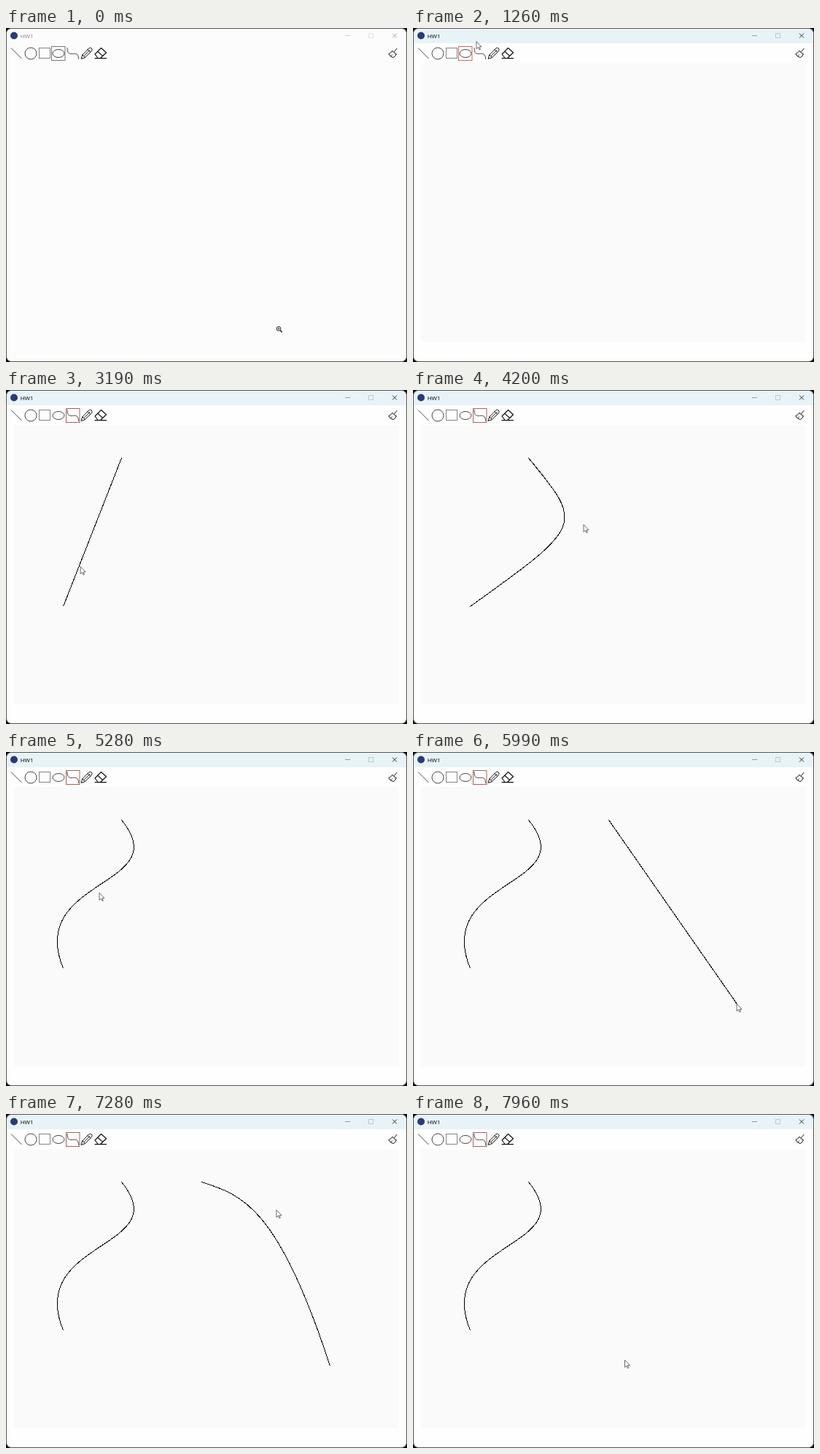
An HTML page that plays this animation: 550 by 459 pixels, repeating every 8 s.

```html
<!DOCTYPE html>
<html lang="en">
<head>
<meta charset="utf-8">
<title>HW1</title>
<style>
html, body { margin: 0; width: 550px; height: 459px; overflow: hidden; background: #000; }
svg { display: block; }
text { font: 8px "Open Sans", sans-serif; fill: #000; }
.icon { fill: none; stroke: #333; stroke-width: .9; }
.icon rect { stroke: #777; }
.bold { fill: none; stroke: #111; stroke-width: 1.2; stroke-linejoin: round; stroke-linecap: round; }
.ink { fill: none; stroke: #000; shape-rendering: crispEdges; }
.pale #window, .pale #bar, .pale #paper { fill: #fcfcfc; }
.pale #caption { opacity: .45; }
#pick { fill: none; stroke: #d9635a; }
.curving #pick { stroke: #a8605a; }
.pale #pick { stroke: #777; }
</style>
</head>
<body>
<svg id="stage" width="550" height="459" viewBox="0 0 550 459">
  <clipPath id="frame"><rect x=".5" y=".5" width="549" height="458" rx="7"/></clipPath>
  <g clip-path="url(#frame)">
    <rect id="window" width="550" height="459" fill="#fefefe"/>
    <rect id="bar" width="550" height="21" fill="#e8f3f7"/>
    <rect id="paper" x="11" y="48" width="527.5" height="384" fill="#fafafa"/>
  </g>
  <rect x=".5" y=".5" width="549" height="458" rx="7" fill="none" stroke="#555"/>

  <circle cx="11" cy="10.5" r="5" fill="#283a78"/>
  <g id="caption">
    <text x="19.7" y="13.6">HW1</text>
    <path d="M465 10.5h7" stroke="#999"/>
    <rect x="497.5" y="7.5" width="6" height="6" fill="none" stroke="#bccad2"/>
    <path d="M530 7.5l6 6m0-6l-6 6" stroke="#333"/>
  </g>

  <g class="icon">
    <path d="M7 27.5L21.5 42"/>
    <circle cx="34" cy="35" r="8"/>
    <rect x="45.5" y="27.5" width="15" height="14"/>
    <ellipse cx="72" cy="35" rx="8" ry="5.5"/>
    <path d="M84 27C84 45 99 26 99.7 43"/>
  </g>
  <g class="bold">
    <path d="M103.3 42l1.4-5 8.8-9q2-1.8 3.8 0t0 3.8l-9 8.8zM105 37l3.2 3.4M106.8 38.6l8.4-8.4M112 29.6l3.6 3.6" stroke-width="1"/>
    <path d="M122 36l8.5-8.5 7 6.2-8 7.8h-3.3zM125.8 32.3l7 6.3M122 41.6h15.5"/>
    <path d="M536 28.3l-3.4 4.2M529.8 31.6l5.4 4.2M529.8 31.6q-2 3-5 4 2 4.2 6.4 5 3.4-1.6 4-4.8M527.8 38.6l1.8-1.8" stroke-width="1"/>
  </g>
  <rect id="pick" x="62.5" y="25.5" width="18.5" height="19"/>

  <path id="first" class="ink"/>
  <path id="second" class="ink"/>

  <g id="lens" fill="none" stroke="#222">
    <circle cx="374" cy="413.3" r="2.9" fill="#fff"/>
    <path d="M372.4 413.3h3.2M374 411.7v3.2" stroke-width=".8"/>
    <path d="M376.2 415.5l2.4 2.6" stroke-width="1.6"/>
  </g>
  <path id="arrow" d="M0 0V10.2L2.4 8 4 11.4 5.4 10.8 3.9 7.4H7Z" fill="#fff" stroke="#444" stroke-width=".8"/>
</svg>
<script>
const LOOP = 8000;
const el = id => document.getElementById(id);
const move = (begin, end, x, y) => ({ begin, end, x, y });

// The hand's moves in order: when each begins and ends, and where it leads
const hand = {
  rise: move(720, 1120, 87, 18.5),
  pickTool: move(1260, 1500, 93, 35),
  start1: move(1540, 2000, 158, 93),
  reach1: move(2140, 2510, 62.5, 331),
  end1: move(2650, 2840, 78, 297),
  grip1: move(3010, 3390, 130, 180),
  bend1: move(3490, 3890, 234, 185),
  twist1: move(4300, 4870, 27, 172),
  pause: move(5180, 5280, 128, 193.5),
  start2: move(5280, 5580, 268, 93),
  end2: move(5720, 5990, 444, 346),
  bend2: move(6330, 6670, 373, 126.5),
  twist2: move(7210, 7960, 290.5, 338)
};

const smooth = p => p * p * (3 - 2 * p);
const mix = (a, b, p) => ({ x: a.x + (b.x - a.x) * p, y: a.y + (b.y - a.y) * p });

function pointer(t) {
  let spot = { x: 374, y: 412 };
  for (const m of Object.values(hand)) {
    if (t < m.begin) break;
    spot = mix(spot, m, smooth(Math.min(1, (t - m.begin) / (m.end - m.begin))));
  }
  return spot;
}

// Draw a line, bend it by pulling both handles, then twist it by pulling the far one.
// pull is how far the handles follow the hand while bending, lag how late they do.
function curve(t, { start, press, end, bend, twist, pull, lag }) {
  if (t < press) return "";
  const drag = m => pointer(Math.min(t - lag, m.end));
  const d = pointer(Math.min(t, end.end));
  let b = start, c = d;
  if (t >= bend.begin + lag) {
    b = mix(start, drag(bend), pull);
    c = mix(d, drag(bend), pull);
  }
  if (t >= twist.begin + lag) c = drag(twist);
  const at = p => `${p.x + .5} ${p.y + .5}`;
  return `M${at(start)}C${at(b)} ${at(c)} ${at(d)}`;
}

const first = {
  start: hand.start1, press: hand.reach1.begin, end: hand.end1,
  bend: hand.bend1, twist: hand.twist1, pull: 1, lag: 0
};
const second = {
  start: hand.start2, press: hand.end2.begin, end: hand.end2,
  bend: hand.bend2, twist: hand.twist2, pull: .52, lag: 70
};

function draw(t) {
  const moving = t >= hand.rise.begin;
  const curving = t >= hand.pickTool.end;
  el("stage").classList.toggle("pale", t < 110);
  el("stage").classList.toggle("curving", curving);
  el("pick").setAttribute("x", curving ? 82.5 : 62.5);
  el("first").setAttribute("d", curve(t, first));
  el("second").setAttribute("d", t < hand.twist2.end ? curve(t, second) : "");
  el("lens").style.display = moving ? "none" : "";
  el("arrow").style.display = moving ? "" : "none";
  const { x, y } = pointer(t);
  el("arrow").setAttribute("transform", `translate(${x} ${y})`);
}

const begin = performance.now();
function tick() {
  draw((performance.now() - begin) % LOOP);
  requestAnimationFrame(tick);
}
tick();
</script>
</body>
</html>
```
